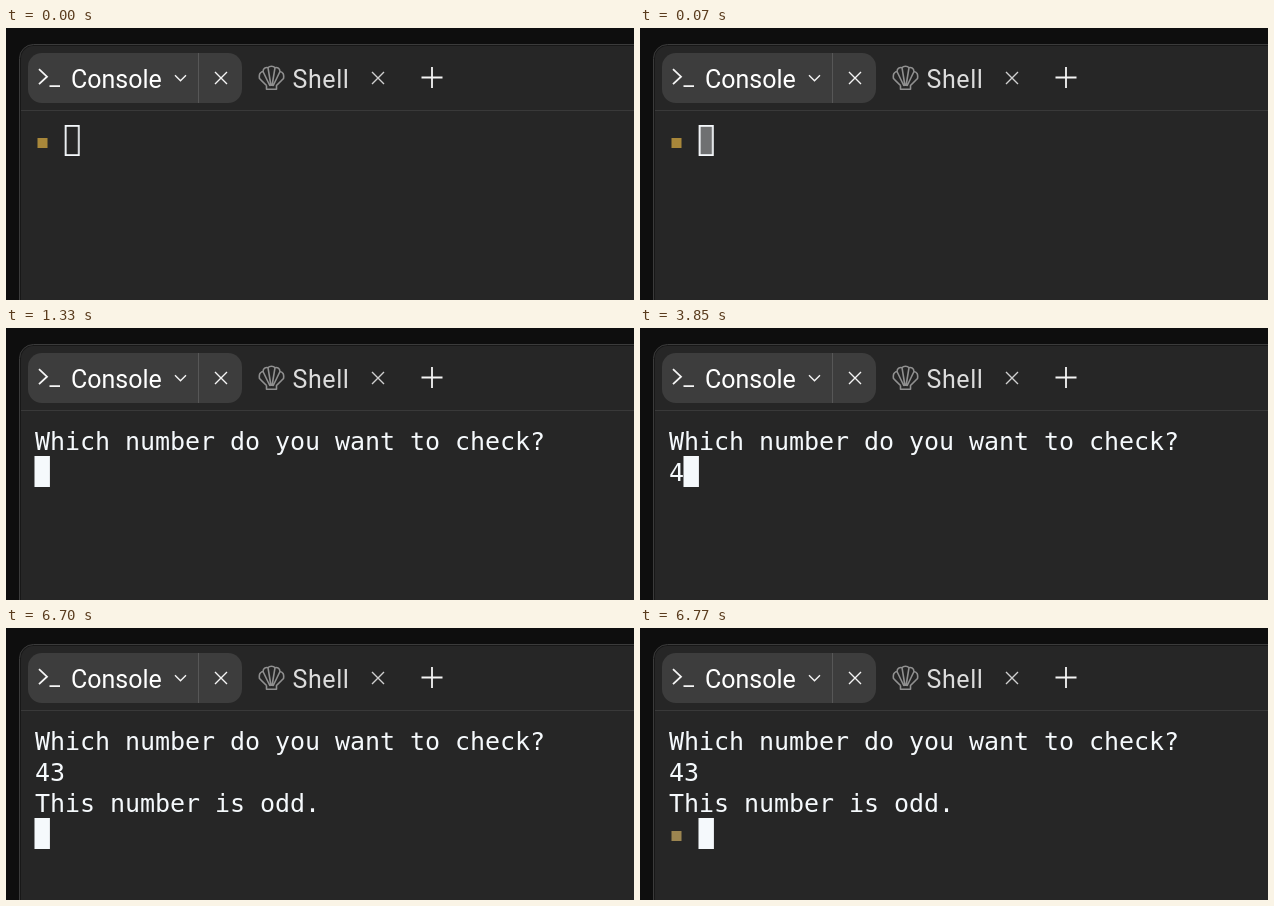
These frames come from a looping animation (628x272 px, 8000 ms). An HTML page:

```html
<!DOCTYPE html>
<html lang="en">
<head>
<meta charset="utf-8">
<title>Console</title>
<style>
  html, body { margin: 0; width: 100%; height: 100%; overflow: hidden; background: #0e0e0e; }
  svg { display: block; width: 628px; height: 272px; }
  .line { fill: none; stroke: #f5f5f5; stroke-width: 1.8; }
  .thin { stroke-width: 1.4; }
  .soft { stroke: #d0d0d0; }
  .shell { stroke: #909090; stroke-width: 1.6; stroke-linejoin: round; }
  .tab { font: 25px Roboto, sans-serif; fill: #fff; }
  .term { font: 25px "DejaVu Sans Mono", monospace; letter-spacing: -.05px; fill: #f5f9fc; white-space: pre; }
  .cursor { fill: #f5f9fc; animation: move 8s step-end infinite; }
  .fill { animation: fill 8s step-end infinite; }

  .term > * { animation: 8s step-end infinite; }
  .term .start { animation-name: start; }
  .term .ask { animation-name: ask; }
  .term .four { animation-name: four; }
  .term .three { animation-name: three; }
  .term .reply { animation-name: reply; }
  .term .prompt { animation-name: prompt; }

  @keyframes start { 0% { opacity: 1 } 16.625%, 100% { opacity: 0 } }
  @keyframes ask { 0% { opacity: 0 } 16.625%, 100% { opacity: 1 } }
  @keyframes four { 0% { opacity: 0 } 48.125%, 100% { opacity: 1 } }
  @keyframes three { 0% { opacity: 0 } 59.75%, 100% { opacity: 1 } }
  @keyframes reply { 0% { opacity: 0 } 83.75%, 100% { opacity: 1 } }
  @keyframes prompt { 0% { opacity: 0 } 84.625%, 100% { opacity: 1 } }
  @keyframes fill {
    0% { opacity: 0 }
    .875% { opacity: .35 }
    1.75% { opacity: .75 }
    2.625%, 100% { opacity: 1 }
  }
  @keyframes move {
    0% { transform: translate(58.7px, 97px) }
    16.625% { transform: translate(28.7px, 128px) }
    48.125% { transform: translate(43.7px, 128px) }
    59.75% { transform: translate(58.7px, 128px) }
    83.75% { transform: translate(28.7px, 190px) }
    84.625%, 100% { transform: translate(58.7px, 190px) }
  }
</style>
</head>
<body>
<svg viewBox="0 0 628 272">
  <rect width="628" height="272" fill="#0e0e0e"/>
  <rect x="13.5" y="16.5" width="660" height="300" rx="14" fill="#181818" stroke="#3b3b3b"/>
  <rect x="15" y="18" width="660" height="300" rx="12.5" fill="#262626"/>
  <path d="M15 82.5H628" stroke="#393939"/>

  <rect x="22" y="25" width="214" height="50" rx="14" fill="#3d3d3d"/>
  <path d="M192.5 25V75" stroke="#575757"/>
  <path class="line" d="M33 41.2L41 48.7L33 56.2M43.5 58.2H54"/>
  <text class="tab" x="65" y="59.5">Console</text>
  <path class="line thin" d="M169 47.2L174.5 52.7L180 47.2"/>
  <path class="line thin" d="M209 44L221 56M221 44L209 56"/>

  <path class="line shell" d="M260.5 57.5L253.5 50.5C252.8 46.5 254 44 257 43.5C257.3 40.5 259.5 39 262 39.7C263.5 37.8 267.5 37.8 269 39.7C271.5 39 273.7 40.5 274 43.5C277 44 278.2 46.5 277.5 50.5L270.5 57.5V61.3H260.5V57.5M257 43.5L264 58M262 39.7L265 58M269 39.7L266 58M274 43.5L267 58"/>
  <text class="tab" x="286.5" y="59.5" letter-spacing=".6" style="fill:#dcdcdc">Shell</text>
  <path class="line thin soft" d="M366 44L378 56M378 44L366 56"/>
  <path class="line" d="M415.5 49.5H436.5M426 39V60"/>

  <g class="term">
    <rect class="start" x="31.5" y="110" width="10" height="10" fill="#a8873a"/>
    <text class="ask" x="29" y="122">Which number do you want to check?</text>
    <text class="four" x="29" y="153">4</text>
    <text class="three" x="44" y="153">3</text>
    <text class="reply" x="29" y="184">This number is odd.</text>
    <rect class="prompt" x="31.5" y="203" width="10" height="10" fill="#9c8550"/>
  </g>
  <g class="cursor">
    <rect x=".9" y=".9" width="13.2" height="29.2" fill="none" stroke="#f5f9fc" stroke-width="1.8"/>
    <rect class="fill" width="15" height="31"/>
  </g>
</svg>
</body>
</html>
```
